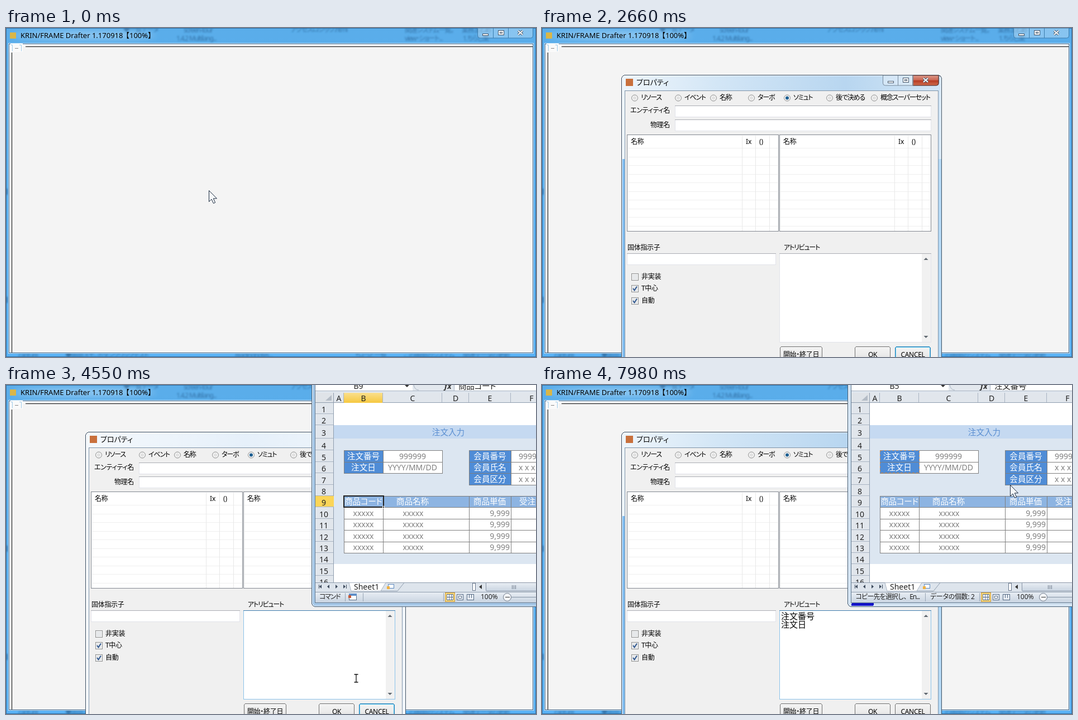
Recreate the animation shown at these times as an HTML page. Size 949 by 590 pixels, loop 8000 ms.

```html
<!DOCTYPE html>
<html lang="ja">
<head>
<meta charset="utf-8">
<title>Property dialog</title>
<style>
html, body { margin: 0; width: 100%; height: 100%; overflow: hidden; }
svg { display: block; }
text { font: 12px "Noto Sans", "Noto Sans CJK JP", "Noto Sans CJK", sans-serif; font-feature-settings: "palt"; white-space: pre; }
rect, .l { shape-rendering: crispEdges; }
.kana { letter-spacing: -1.2px; }
.tight { letter-spacing: -.3px; }
.wide { font-feature-settings: normal; }
.cap { font-size: 13px; }
.cell { font-size: 14.6px; }
.num { font-size: 14px; }
.head { font-size: 14px; }
.memo { font-size: 15px; }
.blur { filter: url(#soft); }
</style>
</head>
<body>
<svg id="stage" width="949" height="590" viewBox="0 0 949 590">
<defs>
  <filter id="soft" x="-20%" y="-100%" width="140%" height="300%"><feGaussianBlur stdDeviation="1.6"/></filter>
  <filter id="glow" x="-20%" y="-100%" width="140%" height="300%"><feGaussianBlur stdDeviation="6"/></filter>
  <linearGradient id="idle" x2="0" y2="1"><stop stop-color="#5aadea"/><stop offset="1" stop-color="#58b1f5"/></linearGradient>
  <linearGradient id="live"><stop stop-color="#6a9cc6"/><stop offset=".3" stop-color="#4582b5"/><stop offset=".8" stop-color="#4582b5"/><stop offset="1" stop-color="#8fb6d4"/></linearGradient>
  <linearGradient id="side" x2="0" y2="1"><stop stop-color="#7fabd0"/><stop offset="1" stop-color="#c3daec"/></linearGradient>
  <linearGradient id="glass"><stop stop-color="#eef5fb"/><stop offset=".3" stop-color="#d3e6f6"/><stop offset=".7" stop-color="#b8d6f0"/><stop offset="1" stop-color="#d3e6f6"/></linearGradient>
  <linearGradient id="pale"><stop stop-color="#f4f8fc"/><stop offset=".5" stop-color="#e6f0fa"/><stop offset="1" stop-color="#f1f6fb"/></linearGradient>
  <linearGradient id="red" x2="0" y2="1"><stop stop-color="#dd9a8b"/><stop offset=".48" stop-color="#cb6450"/><stop offset=".5" stop-color="#b53a22"/><stop offset="1" stop-color="#cf6c4d"/></linearGradient>
  <linearGradient id="btn" x2="0" y2="1"><stop stop-color="#f4f4f4"/><stop offset=".5" stop-color="#ebebeb"/><stop offset="1" stop-color="#d4d4d4"/></linearGradient>
  <linearGradient id="hover" x2="0" y2="1"><stop stop-color="#e5f7ff"/><stop offset=".5" stop-color="#d0f0ff"/><stop offset="1" stop-color="#b5e5fb"/></linearGradient>
  <linearGradient id="gold" x2="0" y2="1"><stop stop-color="#fadf8c"/><stop offset="1" stop-color="#f6c840"/></linearGradient>
  <linearGradient id="bar" x2="0" y2="1"><stop stop-color="#e9eef4"/><stop offset="1" stop-color="#c9d4e1"/></linearGradient>
</defs>
</svg>
<script>
const stage = document.getElementById('stage');

const R = (x, y, w, h, fill, line, more = '') => line
  ? `<rect x="${x + .5}" y="${y + .5}" width="${w - 1}" height="${h - 1}" fill="${fill}" stroke="${line}" ${more}/>`
  : `<rect x="${x}" y="${y}" width="${w}" height="${h}" fill="${fill}" ${more}/>`;
const P = (d, line, fill = 'none', more = '') => `<path d="${d}" fill="${fill}" stroke="${line}" ${more}/>`;
const V = (x, y1, y2, c) => R(x, y1, 1, y2 - y1, c);
const H = (x1, x2, y, c) => R(x1, y, x2 - x1, 1, c);
const T = (x, y, s, cls = '', fill = '#000', anchor = 'start') =>
  `<text x="${x}" y="${y}" dy=".37em" class="${cls}" fill="${fill}" text-anchor="${anchor}">${s}</text>`;
const M = (x, y, s, cls, fill) => T(x, y, s, cls, fill, 'middle');
const G = (id, body) => `<g id="${id}">${body}</g>`;
const range = (n, f) => Array.from({ length: n }, (_, i) => f(i)).join('');

function captionButtons(x, y, widths, red, line) {
  const [a, b, c] = widths, w = a + b + c, ink = '#45566a';
  const X = x + a + b + c / 2, Y = y + 8.5;
  const cross = `M${X - 4} ${Y - 3.5}l8 7M${X + 4} ${Y - 3.5}l-8 7`;
  return P(`M${x + .5} ${y}v14q0 4 4 4h${w - 8}q4 0 4-4v-14z`, line, 'rgba(255,255,255,.28)') +
    (red ? P(`M${x + a + b} ${y}h${c}v14q0 4-4 4h${4 - c}z`, '#5b2a25', 'url(#red)') : '') +
    V(x + a, y, y + 18, line) + V(x + a + b, y, y + 18, line) +
    R(x + a / 2 - 5, y + 10, 11, 4, '#fff', ink) +
    R(x + a + b / 2 - 5, y + 4, 11, 9, '#fff', ink) + R(x + a + b / 2 - 2, y + 7, 5, 3, '#fff', ink) +
    P(cross, ink, 'none', 'stroke-width="4"') + P(cross, '#fff', 'none', 'stroke-width="2"');
}

function mainFrame(live) {
  const ink = live ? '#1d4468' : '#255f92';
  const smudge = [[318, 4, 'screen-tour'], [305, 19, '1.4.2 Multilang...'], [510, 3, 'アクセスロジック.html'],
    [714, 4, '関連システム一覧。'], [714, 19, 'view・ショート...'], [816, 4, '業務まとめ'], [818, 19, '1.ちらし案'],
    [210, 3, '◆一覧データ'], [22, 587, 'capture'], [106, 587, '◆画面メモ、ボタンクリックテスト'],
    [410, 587, 'readingnotes...'], [625, 587, 'ちょっと一覧'], [712, 587, 'この画面のシステム'], [818, 587, '関連データの更新']];
  return R(0, 0, 949, 590, live ? 'url(#live)' : 'url(#idle)') +
    (live ? R(0, 27, 949, 563, '#3f7cb2') + R(0, 27, 5, 138, 'url(#side)') + R(944, 27, 5, 138, 'url(#side)') : '') +
    `<g class="blur" opacity="${live ? .65 : .7}">` + smudge.map(([x, y, s]) => T(x, y, s, 'kana', ink)).join('') +
    R(0, 288, 3, 11, ink) + R(0, 482, 3, 11, ink) + '</g>' +
    `<ellipse cx="140" cy="13" rx="128" ry="8" fill="#fff" opacity="${live ? .55 : .3}" filter="url(#glow)"/>` +
    R(0, 0, 949, 590, 'none', live ? '#23445f' : '#2f6c9f') +
    captionButtons(844, 0, [28, 27, 44], live, live ? '#27455f' : '#3c7dae');
}

const mainClient = R(7, 8, 11, 11, '#d9b648') +
  T(26, 13, 'KRIN/FRAME Drafter 1.170918', 'cap') + T(208, 13, '【100%】', 'cap wide') +
  R(4, 27, 941, 557, '#f4f4f4', '#cfe8fa') + R(5, 28, 939, 555, '#f4f4f4', '#3a6288') +
  R(6, 29, 937, 4, '#fff') + R(6, 29, 4, 553, '#fff') +
  H(35, 943, 33, '#000') + V(10, 44, 582, '#000') +
  R(8, 28, 22, 15, '#fafafa') + P('M9 30.5h2.5v11M24 30.5h3.5v11', '#9fcbe8') + H(16, 22, 36, '#888');

const menuItems = ['エンティティ追加', 'リレーション追加', 'コメント追加', '貼り付け', 'すべて選択', '表示の更新'];
const menu = R(231, 216, 144, 131, '#f1f1f1', '#979797') + V(259, 218, 345, '#dcdcdc') +
  G('hot', R(233, 218, 140, 22, '#d5e8fa', '#a8d0f2', 'rx="2"')) +
  menuItems.map((s, i) => T(266, 229 + i * 21, s, 'kana')).join('');

const dialogFrame = live =>
  R(142, 84, 574, 520, live ? 'url(#glass)' : 'url(#pale)', '#3b4f63', 'rx="7"') +
  R(143, 85, 572, 518, 'none', 'rgba(255,255,255,.75)', 'rx="6"') +
  (live ? R(144, 235, 5, 360, '#7fbcf0') + R(710, 235, 5, 360, '#b5d9f5') : '') +
  captionButtons(610, 85, [27, 27, 46], live, '#77899b');

const field = (x, y, w, h) => R(x, y, w, h, '#fff', '#e2e3ea') + H(x, x + w, y, '#abadb3');
const radio = ([x, s]) => `<circle cx="${x}" cy="125.5" r="5.5" fill="#f2f2f2" stroke="#8e8f8f"/>` +
  `<circle cx="${x}" cy="125.5" r="3" fill="${x === 439 ? '#1d5f92' : '#e2e2e2'}"/>` +
  T(x + 11, 125, s, 'kana');
const check = (y, s, on) => R(160, y, 13, 13, '#f4f4f4', '#8e8f8f') + R(162, y + 2, 9, 9, '#e6e8ea') +
  (on ? P(`M163 ${y + 6}l2.5 3.5l4.5-7`, '#31588f', 'none', 'stroke-width="2"') : '') + T(178, y + 6, s, 'tight');
const list = x => R(x, 191, 272, 174, '#fff', '#828790') +
  range(10, i => H(x + 2, x + 270, Math.round(215 + i * 15.5), '#efefef')) +
  [206, 230, 255].map(d => V(x + d, 193, 364, '#e8e8e8')).join('');
const listHead = x => T(x + 7, 204, '名称', 'tight') + T(x + 213, 204, 'Ix') + T(x + 237, 204, '()');
const button = (x, w, s) => R(x, 571, w, 30, 'url(#btn)', '#707070', 'rx="3"') + M(x + w / 2, 586, s, 'tight');
const tri = (x, y, d, c = '#606870') => P(`M${x - 4} ${y - 2 * d}h8l-4 ${4 * d}z`, 'none', c);

const radios = [[166, 'リソース'], [244, 'イベント'], [307, '名称'], [375, 'ターボ'], [439, 'ソミュト'], [515, '後で決める'], [595, '概念スーパーセット']];
const dialogClient = R(148, 112, 562, 490, '#f0f0f0', '#7e93a8') +
  R(150, 91, 13, 13, '#c9703c') + T(169, 97, 'プロパティ', 'cap') +
  radios.map(radio).join('') +
  T(229, 148, 'エンティティ名', 'tight', '#000', 'end') + T(229, 174, '物理名', 'tight', '#000', 'end') +
  field(238, 139, 459, 21) + field(238, 164, 459, 21) +
  list(152) + list(425) +
  G('hoverHead', R(154, 192, 204, 23, 'url(#hover)', '#9bd2ef')) +
  listHead(152) + listHead(425) +
  T(153, 394, '固体指示子', 'tight') + T(433, 394, 'アトリビュート', 'kana') +
  field(152, 404, 267, 21) +
  check(440, '非実装') + check(461, 'T中心', 1) + check(483, '自動', 1) +
  field(425, 404, 272, 160) + R(680, 405, 16, 158, '#f1f1f1') + tri(687.5, 414, -1) + tri(687.5, 554, 1) +
  G('focusBox', R(425, 404, 272, 160, 'none', '#8cc3ea') + H(425, 697, 404, '#3d7bad')) +
  button(426, 76, '開始・終了日') + button(560, 64, 'OK') + button(632, 64, 'CANCEL') +
  G('focusBtn', R(632, 571, 64, 30, 'none', '#2f7fb5', 'rx="3"') + R(633, 572, 62, 28, 'none', '#52c4ee', 'rx="2"')) +
  G('pasted', T(428, 414, '注文番号', 'memo wide') + T(428, 429, '注文日', 'memo wide')) +
  G('caret1', V(428, 406, 421, '#000')) + G('caret3', V(428, 436, 450, '#000'));

// Spreadsheet
const rowY = [32, 52, 72, 96, 117, 138, 158, 179, 199, 219, 240, 260, 281, 301, 321, 342, 362];
const colX = [587, 605, 675, 781, 829, 904, 978];
const GRID = '#7f7f7f', GREY = '#808080', BLUE = '#4f8cd6';
const rowHead = (r, fill) => R(554, rowY[r - 1], 33, rowY[r] - rowY[r - 1], fill) + H(554, 587, rowY[r] - 1, '#a9b4c2') +
  M(569, (rowY[r - 1] + rowY[r]) / 2 + 2, r, 'head', '#222');
const colHead = (c, fill) => R(colX[c], 14, colX[c + 1] - colX[c], 18, fill) + V(colX[c + 1] - 1, 14, 32, '#a9b4c2') +
  M((colX[c] + colX[c + 1]) / 2, 24, 'ABCDEF'[c], 'head', '#222');
const cell = (c1, c2, r, fill) => R(colX[c1], rowY[r - 1], colX[c2] - colX[c1] + 1, rowY[r] - rowY[r - 1] + 1, fill, GRID);
const mid = r => (rowY[r - 1] + rowY[r]) / 2;
const label = (c, r, s) => cell(c, c + 1, r, BLUE) + M((colX[c] + colX[c + 1]) / 2, mid(r), s, 'cell', '#fff');

function select(r1, r2, line) {
  let s = colHead(1, 'url(#gold)');
  for (let r = r1; r <= r2; r++) s += rowHead(r, '#fbd558');
  const y = rowY[r1 - 1], h = rowY[r2] - y;
  return s + R(605, rowY[r1], 71, rowY[r2] - rowY[r1], 'rgba(20,70,140,.2)') +
    `<rect x="605" y="${y}" width="71" height="${h}" fill="none" stroke="${line}" stroke-width="2"/>` +
    R(674, y + h - 2, 4, 4, '#111', '#fff');
}

const itemRow = r => cell(1, 2, r, '#fff') + cell(2, 4, r, '#fff') + cell(4, 5, r, '#fff') + cell(5, 6, r, '#fff') +
  M(640, mid(r), 'xxxxx', 'num', GREY) + M(729, mid(r), 'xxxxx', 'num', GREY) + T(902, mid(r), '9,999', 'num', GREY, 'end');

const sheetGrid = R(554, 0, 400, 390, '#fff') +
  R(587, 72, 370, 24, '#c5d9f1') + R(587, 96, 370, 225, '#dce6f1') + M(792, 85, '注文入力', 'cell', '#5b8fd2') +
  label(1, 5, '注文番号') + label(1, 6, '注文日') +
  cell(2, 3, 5, '#fff') + M(728, 127.5, '999999', 'num', GREY) + cell(2, 3, 6, '#fff') + M(728, 148, 'YYYY/MM/DD', 'num', GREY) +
  ['会員番号', '会員氏名', '会員区分'].map((s, i) => label(4, 5 + i, s) + cell(5, 6, 5 + i, '#fff') +
    T(918, mid(5 + i), i ? 'x x x x' : '999999', 'num', GREY)).join('') +
  [[1, 2], [2, 4], [4, 5], [5, 6]].map(([a, b]) => cell(a, b, 9, '#8db4e2')).join('') +
  M(640, 209, '商品コード', 'cell tight', '#fff') + M(728, 209, '商品名称', 'cell', '#fff') +
  M(866, 209, '商品単価', 'cell', '#fff') + T(919, 209, '受注数', 'cell', '#fff') +
  range(4, i => itemRow(10 + i)) +
  R(554, 0, 400, 14, '#fff') + R(728, 0, 74, 10, '#e3e8ee') + P('M730 0q2 9 9 9', '#a9b4c2') + V(802, 0, 10, '#a9b4c2') +
  H(554, 949, 10, '#a9b4c2') + R(554, 11, 400, 3, '#dfe6ee') + tri(718, 2, 1, '#333') +
  T(785, 2, '<tspan font-style="italic" font-weight="700">fx</tspan>', 'num', '#333') +
  R(554, 14, 33, 18, '#dfe3e8') + P('M583 18v10h-11z', 'none', '#b4bcc6') +
  range(6, i => colHead(i, '#e1e6ec')) + range(16, i => rowHead(i + 1, '#e1e6ec')) +
  H(554, 949, 31, '#8f9dae') + V(586, 14, 354, '#8f9dae');

const name = (ref, s) => M(631, 2, ref, 'num', '#222') + T(810, 2, s, 'cell tight', '#222');

const sheetFoot = R(554, 354, 400, 17, '#dde4ec') + H(554, 949, 354, '#8f9dae') +
  P('M614 354.5h66l-9 15h-53z', '#a9b4c2', '#fff') + T(623, 362, 'Sheet1', 'num', '#222') +
  P('M671 369.5h30l12-15', '#8f9dae') + R(684, 357, 11, 8, '#fff', '#5b87bd') + R(682, 361, 5, 5, '#f0b040') +
  [563, 577, 592, 606].map((x, i) => P(i < 2 ? `M${x + 2} 358v7l-4-3.5z` : `M${x - 2} 358v7l4-3.5z`, 'none', '#3d4a5c')).join('') +
  V(560, 358, 365, '#3d4a5c') + V(609, 358, 365, '#3d4a5c') +
  R(835, 355, 6, 14, '#fff', '#66758a') + P('M852 358v8l-5-4z', 'none', '#333') +
  R(859, 354, 100, 16, 'url(#bar)', '#8894a5', 'rx="2"') + [906, 909, 912].map(x => V(x, 359, 366, '#6b7788')).join('') +
  R(554, 371, 400, 19, 'url(#bar)') + H(554, 949, 371, '#8f9dae') +
  R(786, 372, 18, 17, '#fddc7c', '#c8963a') +
  R(789, 375, 12, 11, '#fff', '#566b85') + H(789, 801, 380, '#566b85') + V(793, 375, 386, '#566b85') + V(797, 375, 386, '#566b85') +
  R(807, 375, 12, 11, '#e9eef4', '#566b85') + R(810, 378, 6, 5, '#fff', '#566b85') +
  R(825, 375, 13, 11, '#e9eef4', '#566b85') + V(829, 375, 382, '#566b85') + V(833, 375, 382, '#566b85') +
  V(783, 373, 388, '#98a5b5') + T(850, 380, '100%', '', '#222') +
  H(905, 949, 380, '#8391a3') + '<circle cx="897.500" cy="380.500" r="7" fill="#f4f6f9" stroke="#6b7788"/>' + R(894, 380, 8, 1, '#333');

const sheetFrame = fill => R(547, -10, 420, 408, fill, '#3f5870', 'rx="7"') + R(548, -9, 418, 406, 'none', '#e3eff9', 'rx="6"');

const sheet = G('sheetLive', sheetFrame('#a6c8e8')) + G('sheetIdle', sheetFrame('#d3e3f2')) +
  R(553, -5, 410, 396, '#fff', '#61788f') + sheetGrid +
  G('refA', name('B9', '商品コード')) + G('refB', name('B5', '注文番号')) +
  G('selA', select(9, 9, '#222')) + G('selB', select(5, 5, '#6d4a2c')) + G('selC', select(5, 6, '#222')) +
  G('ants', '<rect x="605.500" y="117.500" width="70" height="40" fill="none" stroke="#5b8fd2"/>' +
    '<rect x="605.500" y="117.500" width="70" height="40" fill="none" stroke="#c48a55" stroke-dasharray="4 3"/>') +
  sheetFoot +
  G('ready', T(561, 380, 'コマンド', 'kana', '#222') + V(607, 373, 388, '#98a5b5') + V(639, 373, 388, '#98a5b5') +
    R(614, 374, 14, 12, '#fff', '#5b6f88') + R(614, 374, 14, 4, '#5f8fc8') + R(613, 377, 5, 5, '#c65a3a')) +
  G('copying', T(561, 380, 'コピー先を選択し、En...', 'kana wide', '#222') + V(686, 373, 388, '#98a5b5')) +
  G('count', T(695, 380, 'データの個数: 2', 'tight', '#222')) +
  G('streak', R(554, 391, 40, 5, '#1414c8', '', 'rx="2"'));

const pointers =
  G('arrow', P('M.5.5v20l4.500-4.500l3.500 7.500l3.200-1.500l-3.400-7.200h6.200z', '#1b2b3f', '#f6f8fa')) +
  G('beam', P('M-3.500-7h3l.5.5l.5-.5h3M0-7v14M-3.500 7h3l.5-.5l.5.5h3', '#111', 'none', 'stroke-width="1.300"')) +
  G('cross', P('M-7 0h14M0-7v14', '#111', 'none', 'stroke-width="6"') + P('M-6 0h12M0-6v12', '#fff', 'none', 'stroke-width="3"'));

stage.insertAdjacentHTML('beforeend',
  G('mainIdle', mainFrame(false)) + G('mainLive', mainFrame(true)) + mainClient + G('menu', menu) +
  G('dialog', G('dlgLive', dialogFrame(true)) + G('dlgIdle', dialogFrame(false)) + dialogClient) +
  G('sheet', sheet) + G('pointer', pointers));

const LOOP = 8000, STEP = 70;

// Visible spans: id -> from, to, from, to ...
const spans = {
  mainIdle: [0, 1680, 2660, LOOP], mainLive: [1680, 2660],
  menu: [1820, 2660], hot: [2240, 2660],
  dialog: [2660, LOOP], dlgLive: [2660, 4200, 6790, LOOP], dlgIdle: [4200, 6790], focusBtn: [2660, 6790],
  sheet: [4270, LOOP], sheetLive: [4270, 6790], sheetIdle: [6790, LOOP],
  refA: [4270, 5320], refB: [5320, LOOP],
  selA: [4270, 5320], selB: [5320, 6020], selC: [6020, 6790],
  ready: [4270, 6090], copying: [6090, LOOP], count: [6020, LOOP], ants: [6090, LOOP],
  caret1: [7140, 7420], caret3: [7420, 7700], pasted: [7420, LOOP], streak: [7420, LOOP],
  pointer: [0, 2660, 2940, 4200, 4550, LOOP]
};

// Pointer path: time, x, y
const path = [
  [0, 363, 291], [420, 230, 215], [2170, 230, 215], [2310, 253, 217], [3220, 253, 217], [3290, 261, 213],
  [3430, 365, 285], [3570, 520, 445], [3710, 614, 542], [4480, 614, 542], [4620, 640, 510], [4830, 697, 345],
  [5040, 660, 165], [5180, 643, 124], [5390, 643, 124], [5740, 648, 147], [6090, 648, 147], [6370, 645, 235],
  [6580, 598, 405], [6650, 571, 435], [6720, 541, 438], [7350, 541, 438], [7420, 586, 365], [7630, 586, 365],
  [7980, 838, 179], [LOOP, 838, 179]
];

const el = id => document.getElementById(id);
const show = (id, on) => { el(id).style.display = on ? '' : 'none'; };
const within = (t, s) => s.some((from, i) => i % 2 === 0 && t >= from && t < s[i + 1]);

function pointerAt(t) {
  const i = path.findIndex((p, k) => k && t < p[0]);
  const [t0, x0, y0] = path[i - 1], [t1, x1, y1] = path[i];
  const k = (t - t0) / (t1 - t0);
  return [Math.round(x0 + (x1 - x0) * k), Math.round(y0 + (y1 - y0) * k)];
}

function render(t) {
  for (const id in spans) show(id, within(t, spans[id]));
  const [x, y] = pointerAt(Math.floor(t / STEP) * STEP);
  const seen = within(t, spans.pointer) && t >= 2660;
  const inBox = seen && x > 425 && x < 680 && y > 404 && y < 564;
  const inCells = t >= 4270 && t < 6790 && x > 587 && y > 32 && y < 354;
  show('beam', inBox);
  show('cross', inCells);
  show('arrow', !inBox && !inCells);
  show('hoverHead', seen && t >= 3290 && t < 4200 && x > 154 && x < 358 && y > 192 && y < 215);
  show('focusBox', inBox || t >= 6790);
  el('pointer').setAttribute('transform', `translate(${x} ${y})`);
}

const start = performance.now();
function tick() {
  render((performance.now() - start) % LOOP);
  requestAnimationFrame(tick);
}
tick();
</script>
</body>
</html>
```
